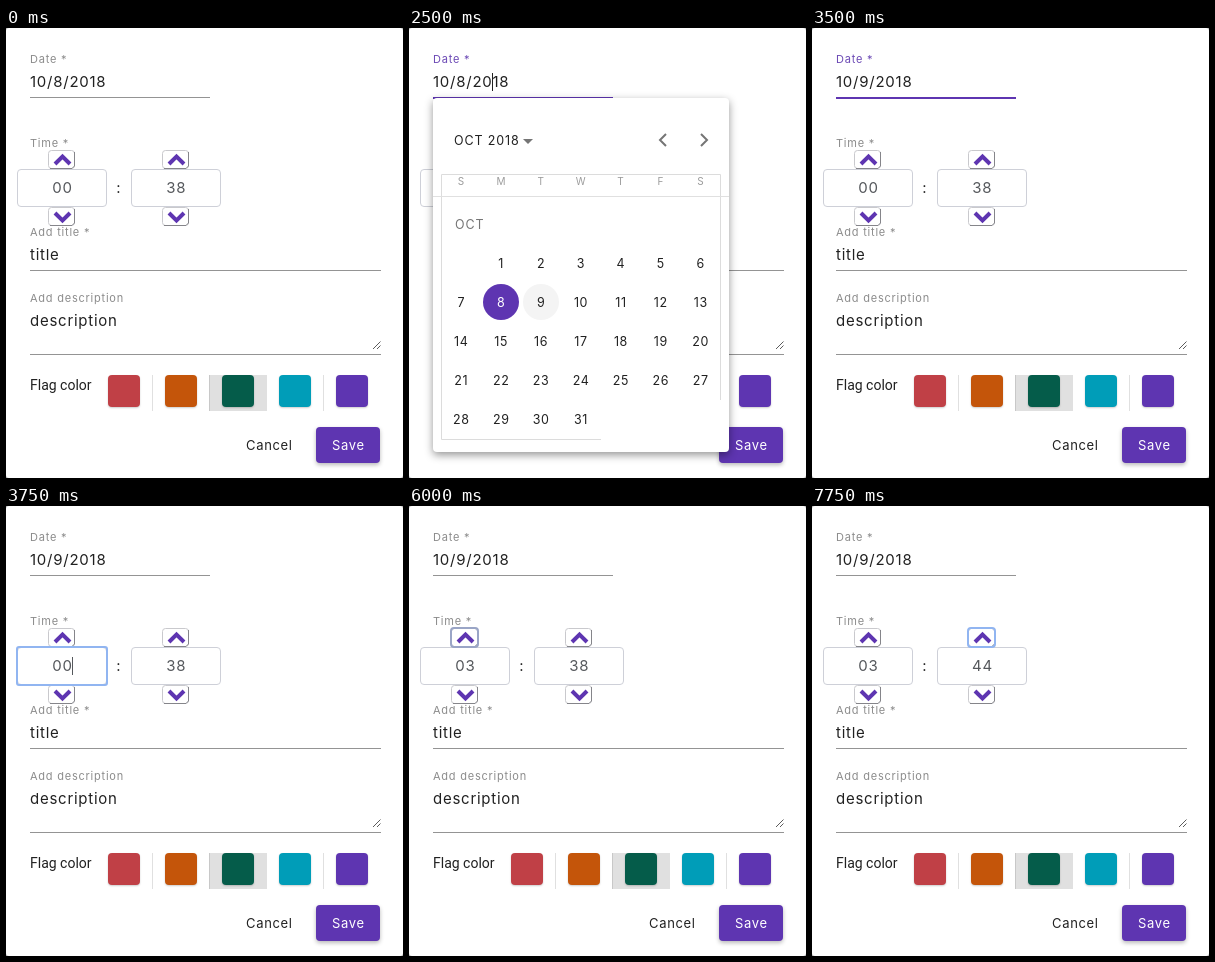
These frames come from a looping animation (397 px wide and 450 px high, 8000 ms). An HTML page with a canvas:

```html
<!DOCTYPE html>
<html lang="en">
<head>
<meta charset="utf-8">
<title>Event form</title>
<style>
html, body { margin: 0; width: 100%; height: 100%; overflow: hidden; background: #fff; }
canvas { display: block; width: 397px; height: 450px; }
</style>
</head>
<body>
<canvas id="stage" width="397" height="450"></canvas>
<script>
const canvas = document.getElementById('stage');
const ctx = canvas.getContext('2d');
const LOOP = 8000;
const PURPLE = '#5e35b1', INK = '#212121', HINT = '#8c8c8c', RULE = '#949494', RING = '#91b5f1';
const FLAGS = ['#c04046', '#c4550a', '#055c4a', '#009db8', PURPLE];

// Value of the last step [start, value] reached at time t.
function at(steps, t) {
  let value = steps[0][1];
  for (const [start, v] of steps) if (t >= start) value = v;
  return value;
}

const HOUR = [[0, '00'], [5500, '01'], [6000, '03']];
const MINUTE = [[0, '38'], [7000, '39'], [7250, '41'], [7500, '42'], [7750, '44']];
const FOCUS = [[0, ''], [1500, 'date'], [3750, 'hour'], [5500, 'hourUp'], [7000, 'minuteUp']];
const CARET = [[0, false], [1500, true], [2000, false], [2500, true], [3500, false],
  [3750, true], [4500, false], [5000, true], [5500, false]];

function stateAt(t) {
  return {
    date: t < 2750 ? '10/8/2018' : '10/9/2018',
    hour: at(HOUR, t),
    minute: at(MINUTE, t),
    focus: at(FOCUS, t),
    caret: at(CARET, t),
    calendar: t >= 1500 && t < 2750,
    hover: t >= 2250
  };
}

// Tracking is in em.
function text(str, x, y, size, color, align = 'left', tracking = .05, family = 'Inter') {
  const gap = size * tracking;
  ctx.font = `${size}px ${family}, sans-serif`;
  ctx.letterSpacing = `${gap}px`;
  ctx.textAlign = align;
  ctx.fillStyle = color;
  ctx.fillText(str, align === 'center' ? x + gap / 2 : x, y);
}

function label(str, y, color = HINT) {
  text(str, 24, y, 11, color, 'left', .07);
}

function rect(x, y, w, h, color) {
  ctx.fillStyle = color;
  ctx.fillRect(x, y, w, h);
}

function box(x, y, w, h, r, fill, stroke, width = 1) {
  ctx.beginPath();
  ctx.roundRect(x, y, w, h, r);
  if (fill) { ctx.fillStyle = fill; ctx.fill(); }
  if (stroke) { ctx.strokeStyle = stroke; ctx.lineWidth = width; ctx.stroke(); }
}

function raised(x, y, w, h, r, fill, blur, drop, alpha) {
  ctx.save();
  ctx.shadowColor = `rgba(0,0,0,${alpha})`;
  ctx.shadowBlur = blur;
  ctx.shadowOffsetY = drop;
  box(x, y, w, h, r, fill);
  ctx.restore();
}

function line(points, color, width) {
  ctx.beginPath();
  points.forEach(([x, y]) => ctx.lineTo(x, y));
  ctx.strokeStyle = color;
  ctx.lineWidth = width;
  ctx.stroke();
}

function disc(x, y, r, color) {
  ctx.beginPath();
  ctx.arc(x, y, r, 0, Math.PI * 2);
  ctx.fillStyle = color;
  ctx.fill();
}

function stepButton(x, y, dir, ring) {
  box(x + .5, y + .5, 26, 18, 3, '#fff', '#c9c9cd');
  line([[x + 2, y + 18.5], [x + 24, y + 18.5], [x + 26.5, y + 16], [x + 26.5, y + 2]], '#85858a', 1);
  if (ring) box(x, y, 27, 19, 3, null, ring, 2);
  const cx = x + 14.5, cy = y + 10;
  line([[cx - 7.5, cy + 4 * dir], [cx, cy - 3.5 * dir], [cx + 7.5, cy + 4 * dir]], PURPLE, 4);
}

function spinner(x, value, focused, ring) {
  box(x + .5, 141.5, 89, 37, 3.5, '#fff', '#ced0d8');
  text(value, x + 45, 165, 15, '#55585c', 'center');
  stepButton(x + 31, 122, 1, ring);
  stepButton(x + 31, 179, -1);
  if (focused) box(x, 141, 90, 38, 2, null, RING, 2);
}

function form(s) {
  const dateOn = s.focus === 'date';
  label('Date *', 35, dateOn ? '#6c4ab5' : HINT);
  text(s.date, 24, 59, 15, INK);
  rect(24, 69, 180, dateOn ? 2 : 1, dateOn ? PURPLE : RULE);

  label('Time *', 119);
  label('Add title *', 208);
  spinner(11, s.hour, s.focus === 'hour', s.focus === 'hourUp' && '#9aa5c6');
  text(':', 112.5, 165, 15, INK, 'center');
  spinner(125, s.minute, false, s.focus === 'minuteUp' && RING);

  text('title', 24, 232, 15, INK);
  rect(24, 242, 351, 1, RULE);
  label('Add description', 274);
  text('description', 24, 298, 15, INK);
  rect(24, 326, 351, 1, RULE);
  line([[367, 321], [374.5, 313.5]], '#5c5c5c', 1);
  line([[371, 321], [374.5, 317.5]], '#5c5c5c', 1);

  text('Flag color', 24, 362, 14, INK, 'left', 0, 'Roboto');
  rect(204, 347, 57, 36, '#e0e0e0');
  FLAGS.forEach((color, i) => {
    const x = 102 + 57 * i;
    if (i && i !== 3) rect(x - 13, 347, 1, 36, i === 2 ? '#c8c8c8' : '#e0e0e0');
    raised(x, 347, 32, 32, 4, color, 2, 1, .2);
  });

  text('Cancel', 263, 422, 13, INK, 'center');
  raised(310, 399, 64, 36, 4, PURPLE, 4, 2, .28);
  text('Save', 342, 422, 13, '#fff', 'center');
}

function calendar(hover) {
  raised(24, 70, 296, 354, 4, '#fff', 8, 3, .42);
  text('OCT 2018', 45, 117, 12.5, INK, 'left', .07);
  ctx.beginPath();
  ctx.moveTo(114, 111);
  ctx.lineTo(124, 111);
  ctx.lineTo(119, 116);
  ctx.fillStyle = '#757575';
  ctx.fill();
  line([[257, 106], [251, 112], [257, 118]], '#757575', 2);
  line([[292, 106], [298, 112], [292, 118]], '#757575', 2);

  line([[192, 411.5], [32.5, 411.5], [32.5, 146.5], [311.5, 146.5], [311.5, 372]], '#dcdcdc', 1);
  rect(24, 168, 296, 1, '#e0e0e0');
  [...'SMTWTFS'].forEach((day, i) => text(day, 52 + 39.9 * i, 157, 10, '#9b9b9b', 'center'));
  text('OCT', 46, 201, 12.5, '#757575', 'left', .07);

  if (hover) disc(132, 274, 18, '#f4f4f4');
  disc(92, 274, 18, PURPLE);
  for (let d = 1; d <= 31; d++) {
    const x = 52 + 39.9 * (d % 7), y = 240 + 39 * Math.floor(d / 7);
    text(d, x, y, 12.5, d === 8 ? '#fff' : INK, 'center');
  }
}

function draw(t) {
  const s = stateAt(t);
  rect(0, 0, 397, 450, '#a8a8a8');
  box(0, 0, 397, 450, 3, '#fff');
  form(s);
  if (s.calendar) calendar(s.hover);
  if (s.caret) {
    if (s.focus === 'hour') rect(66, 151, 1, 18, '#55585c');
    else rect(s.calendar ? 83 : 100, 45, 1, 18, s.calendar ? INK : PURPLE);
  }
}

function tick(now) {
  draw(now % LOOP);
  requestAnimationFrame(tick);
}
requestAnimationFrame(tick);
</script>
</body>
</html>
```
